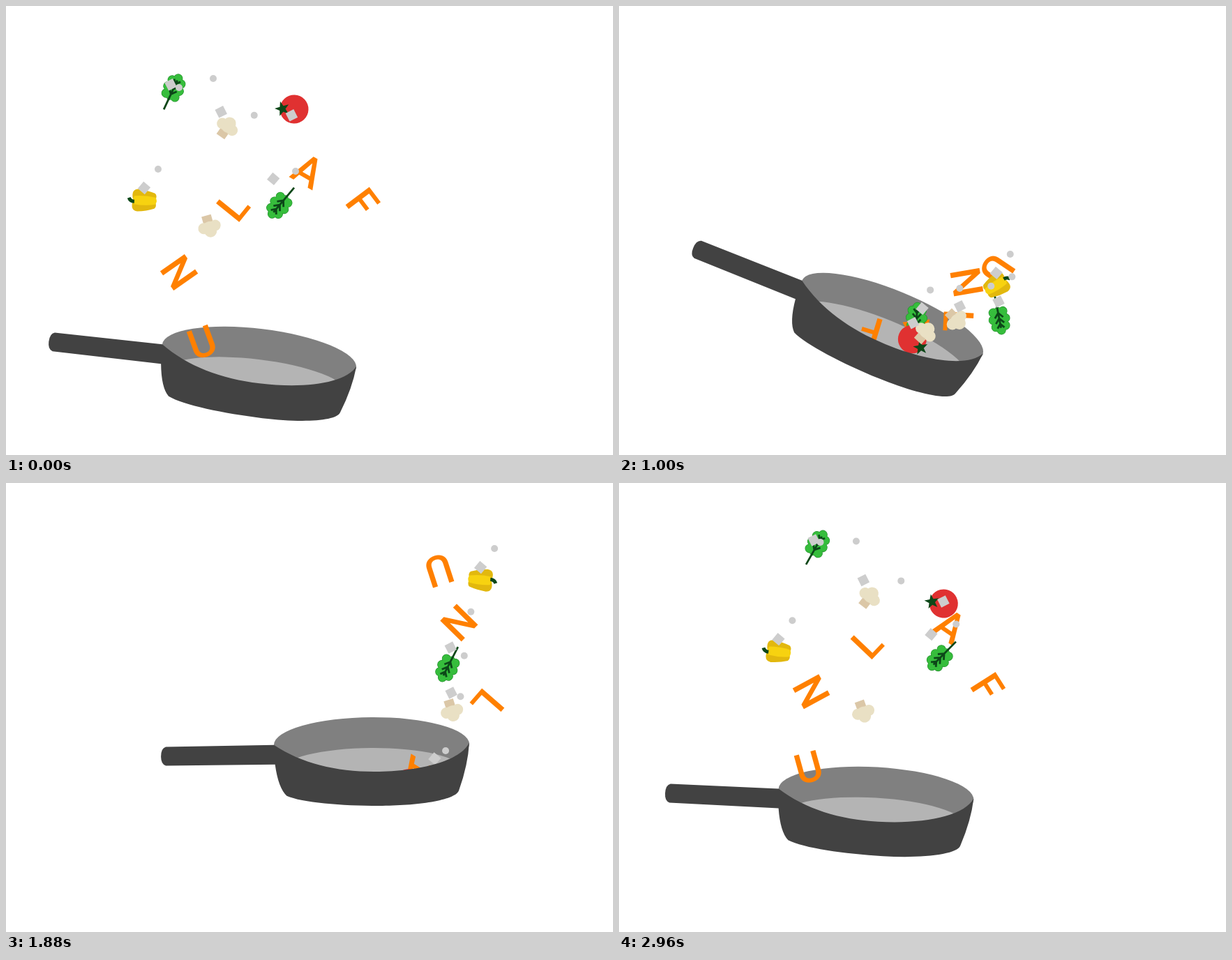
Write an HTML page with a canvas that moves like this. It is 870 px wide and 644 px high and loops after 3000 ms.

```html
<!DOCTYPE html>
<html lang="en">
<head>
<meta charset="utf-8">
<title>Pan toss</title>
<style>
html, body { margin: 0; width: 100%; height: 100%; overflow: hidden; background: #fff; }
canvas { display: block; }
</style>
</head>
<body>
<canvas id="stage" width="870" height="644"></canvas>
<script>
const ctx = document.getElementById('stage').getContext('2d');
const LOOP = 3000, STEP = 50;
const PERIOD = 62; // slightly longer than the 60 visible steps: the loop skips the last two
const CATCH = 13, LAUNCH = 27, RISE = 45, TURN = 53;
const RAD = Math.PI / 180;
const DARK = '#424242', STALK = '#0c4718', ORANGE = '#ff8000', CRUMB = '#cdcdcd';

// Periodic cubic through [time, ...values] keys, returns the values at t
function spline(keys, t, tension = 0.75) {
  const n = keys.length;
  const timeAt = i => keys[(i + n) % n][0] + Math.floor(i / n) * PERIOD;
  let i = n - 1;
  while (keys[i][0] > t) i--;
  const h = timeAt(i + 1) - timeAt(i), u = (t - timeAt(i)) / h, v = 1 - u;
  return keys[0].slice(1).map((_, axis) => {
    const valueAt = j => keys[(j + n) % n][axis + 1];
    const slope = j => (valueAt(j + 1) - valueAt(j)) / (timeAt(j + 1) - timeAt(j));
    const tangent = j => {
      const before = timeAt(j) - timeAt(j - 1), after = timeAt(j + 1) - timeAt(j);
      return tension * (slope(j - 1) * after + slope(j) * before) / (before + after);
    };
    return valueAt(i) * v * v * (1 + 2 * u) + valueAt(i + 1) * u * u * (1 + 2 * v)
      + h * u * v * (tangent(i) * v - tangent(i + 1) * u);
  });
}

function placed(x, y, angle, draw) {
  ctx.save();
  ctx.translate(x, y);
  ctx.rotate(angle * RAD);
  draw();
  ctx.restore();
}

function ellipse(x, y, rx, ry, color) {
  ctx.fillStyle = color;
  ctx.beginPath();
  ctx.ellipse(x, y, rx, ry, 0, 0, 7);
  ctx.fill();
}

function shape(path, color) {
  ctx.fillStyle = color;
  ctx.fill(new Path2D(path));
}

function stroke(path, color, width) {
  ctx.strokeStyle = color;
  ctx.lineWidth = width;
  ctx.stroke(new Path2D(path));
}

// Pan: time, x, y, tilt
const panKeys = [
  [0, 363, 502, 6.9],
  [CATCH, 346, 452, 12],
  [24, 428, 446, 25],
  [LAUNCH, 466, 444.5, 22],
  [37, 524, 375, -0.3],
  [RISE, 512.5, 371, -18.6],
  [TURN, 423.5, 380, -9.3],
  [56, 349, 400, -4],
  [59, 368.5, 446.5, 3.3]
];

function panAt(t) {
  const [x, y, tilt] = spline(panKeys, t);
  return { x, y, tilt };
}

function panBack() {
  ellipse(0, 0, 140, 39, '#808080');
  ellipse(0, 37, 130, 32, '#b4b4b4');
}

function panFront() {
  shape('M-140 0C-100 27 -50 39 5 39C70 39 128 24 140 -2Q138 30 125 66C122 80 70 88 15 88' +
    'C-40 88 -100 83 -122 73Q-134 62 -138.5 28L-295 29Q-302 27 -302 16Q-302 4 -295 2Z', DARK);
}

// Ingredients
const letter = char => () => {
  ctx.font = '500 60px Roboto, sans-serif';
  ctx.textAlign = 'center';
  ctx.fillStyle = ORANGE;
  ctx.fillText(char, 0, 21.5);
};

function tomato() {
  ellipse(0, 0, 20.5, 20.5, '#e03131');
  ctx.fillStyle = STALK;
  ctx.beginPath();
  for (let i = 0; i < 10; i++) {
    const r = i % 2 ? 4.5 : 11, a = i * 36 * RAD;
    ctx.lineTo(Math.sin(a) * r, -17 - Math.cos(a) * r);
  }
  ctx.fill();
}

function pepper() {
  for (const side of [-1, 1]) {
    ctx.save();
    ctx.scale(side, 1);
    shape('M-1 -16Q-15 -20 -16 -9Q-15 4 -11 15Q-8 19 -1 16Z', '#e2b80e');
    ctx.restore();
  }
  shape('M-6 -14Q0 -18 6 -14Q8 2 5 16Q0 20 -5 16Q-8 2 -6 -14Z', '#f7d210');
  stroke('M-2 -14Q-2 -20 3 -22', STALK, 5);
}

function mushroom() {
  shape('M-7 2H7V15H-7Z', '#dbc7a7');
  const cap = '#e9e0c4';
  for (const side of [-1, 1]) ellipse(side * 8.5, -2, 8, 8, cap);
  ellipse(0, -8, 9, 9, cap);
  ellipse(0, 0, 9, 6, cap);
}

function leaf() {
  const blade = (grow, color) => {
    ellipse(0, -6, 8 + grow, 18 + grow, color);
    ellipse(0, -21, 6 + grow, 6 + grow, color);
    for (const side of [-1, 1])
      for (const row of [-1, 0, 1])
        ellipse(side * (9 - 2 * row * row), -5 + row * 10.5, 6 + grow, 6 + grow, color);
  };
  blade(0.6, '#238a2c');
  blade(0, '#36bd3c');
  stroke('M0 28V-18M-6 -3L0 4L6 -3M-6 -11L0 -4L6 -11M-5 -18L0 -12L5 -18', STALK, 2.8);
}

const dot = () => ellipse(0, 0, 5, 5, CRUMB);
const cube = () => shape('M-6.5 -6.5H6.5V6.5H-6.5Z', CRUMB);

// A throw passes four points; `order` (0 first, 1 last) sets the place in the pan when caught
function toss(draw, order, rest, [fall, launch, rise, turn], spin = 200) {
  const pan = panAt(CATCH);
  const keys = [
    [0, ...fall],
    [CATCH, pan.x + 110 - 190 * order, pan.y + 35 - 75 * order],
    [LAUNCH, ...launch],
    [RISE, ...rise],
    [TURN, ...turn]
  ];
  return {
    draw,
    at: t => spline(keys, t),
    angle: t => rest + spin * Math.sin(Math.PI * t / PERIOD) ** 2
  };
}

const letters = [
  toss(letter('U'), 0, -20, [[281, 482], [608, 256], [546, 92], [296, 219]]),
  toss(letter('N'), 0.25, -125, [[248, 382], [577, 302], [619, 140], [383, 117]], 285),
  toss(letter('L'), 0.5, -51, [[325, 287], [615, 423], [661, 220], [453, 123]]),
  toss(letter('A'), 0.75, 30, [[433, 236], [560, 485], [575, 322], [562, 170]]),
  toss(letter('F'), 1, 53, [[511, 282], [483, 502], [497, 385], [538, 337]])
];

const food = [
  toss(pepper, 0.2, -87, [[198, 279], [642, 293], [613, 74], [352, 166]]),
  toss(leaf, 0.1, 25, [[238, 123], [630, 358], [577, 175], [423, 70]]),
  toss(mushroom, 0.3, 35, [[316, 175], [564, 394], [633, 262], [482, 180]], 140),
  toss(leaf, 0.8, -140, [[395, 282], [565, 457], [615, 362], [614, 200]]),
  toss(tomato, 0.8, -88, [[413, 148], [553, 494], [570, 392], [576, 274]], 310),
  toss(mushroom, 0.7, 164, [[291, 315], [550, 488], [500, 420], [491, 373]], -170)
];

// Crumbs drift along between neighbouring pieces of food
function crumb(draw, place, dx, dy, tilt) {
  const i = Math.floor(place), mix = place - i;
  return {
    draw,
    at(t) {
      const [ax, ay] = food[i].at(t), [bx, by] = food[i + 1].at(t);
      return [ax + (bx - ax) * mix + dx, ay + (by - ay) * mix + dy];
    },
    angle: () => tilt
  };
}

const crumbs = [];
for (let i = 0; i < 5; i++) {
  crumbs.push(crumb(dot, i * 0.75, 20, -45, 0));
  crumbs.push(crumb(cube, i * 0.95, 0, -18, i % 3 ? -27 : 40));
}

const items = [...letters, ...food, ...crumbs];

function drawItem(item, t, pan) {
  let [x, y] = item.at(t);
  const reach = x - pan.x;
  // the pan's floor holds whatever has landed
  if (Math.abs(reach) < 150) y = Math.min(y, pan.y + 56 + reach * Math.tan(pan.tilt * RAD));
  placed(x, y, item.angle(t), item.draw);
}

function render(now) {
  const t = Math.floor((now % LOOP) / STEP);
  const pan = panAt(t);
  ctx.fillStyle = '#fff';
  ctx.fillRect(0, 0, 870, 644);
  placed(pan.x, pan.y, pan.tilt, panBack);
  for (const item of items) drawItem(item, t, pan);
  placed(pan.x, pan.y, pan.tilt, panFront);
}

let start;
function tick(now) {
  start ??= now;
  render(now - start);
  requestAnimationFrame(tick);
}
render(0);
requestAnimationFrame(tick);
</script>
</body>
</html>
```
